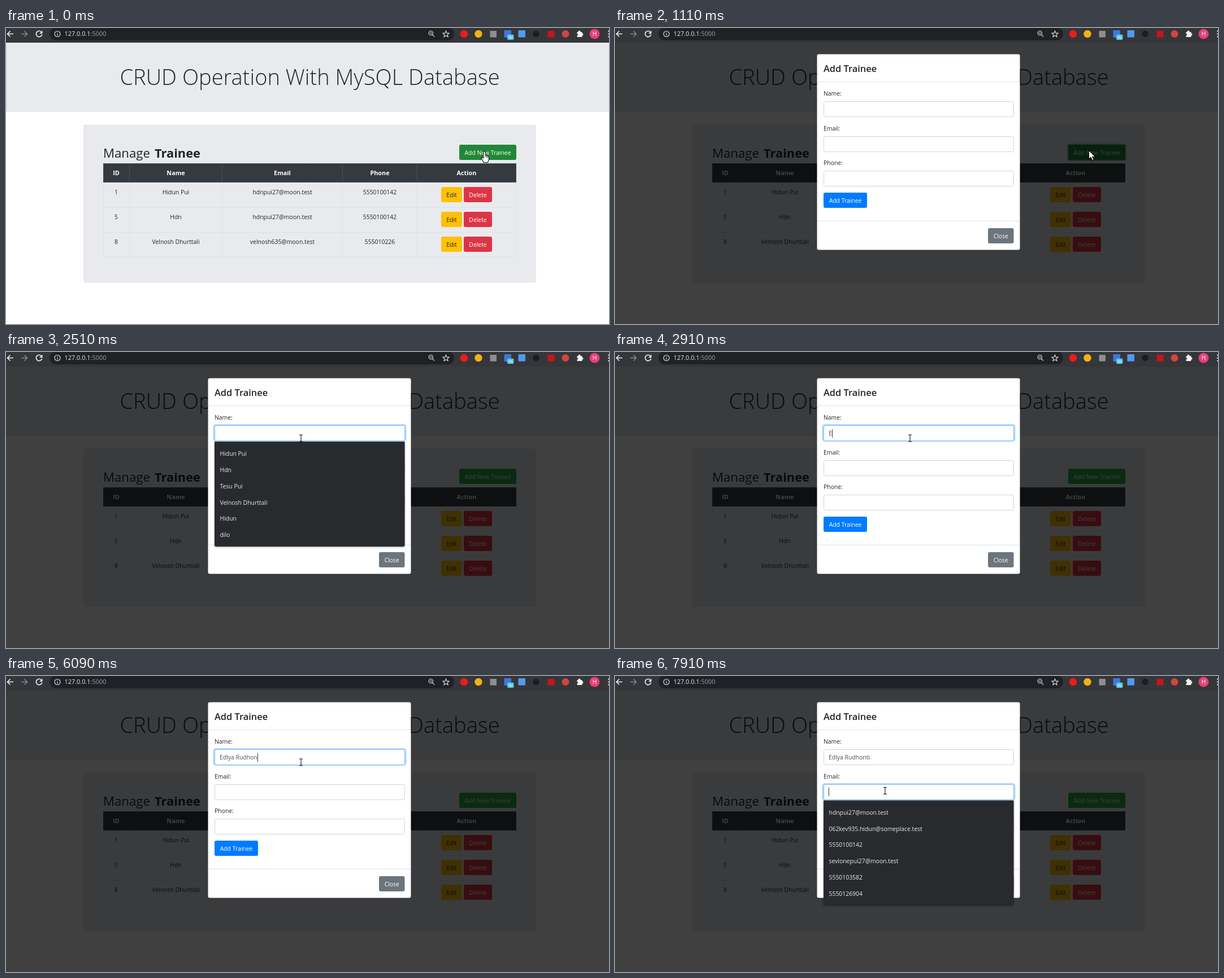
Animation of 1067x525 px, one loop 8000 ms. Source, as an HTML page with a canvas:

```html
<!DOCTYPE html>
<html lang="en">
<head>
<meta charset="utf-8">
<title>Manage Trainee</title>
<style>
html, body { margin: 0; width: 100%; height: 100%; overflow: hidden; background: #fff; }
canvas { display: block; width: 1067px; height: 525px; }
</style>
</head>
<body>
<canvas id="stage" width="1067" height="525"></canvas>
<script>
const ctx = document.getElementById('stage').getContext('2d');
const LOOP = 8000, BODY = 10.4, PANEL = '#e9eaee', INK = '#212529', BAR = 26;

const fullName = 'Edlya Rudhonti';
const keyTimes = [2910, 3730, 4010, 4160, 4310, 4430, 4890, 5350, 5520, 5820, 5940, 6090, 6340, 6640];
const caretOn = [[1930, 2510], [2910, 3450], [3730, 7070], [7610, 7910]];
const pointerSteps = [
  [0, 'hand', 846.5, 218.5], [600, 'arrow', 843, 236], [720, 'hand', 839.5, 216.5],
  [1110, 'arrow', 838.5, 217], [1390, 'arrow', 664, 226], [1540, 'beam', 586, 204],
  [1660, 'arrow', 538, 166], [1780, 'beam', 522, 153], [7480, 'beam', 508, 168],
  [7610, 'arrow', 486, 181], [7760, 'beam', 478, 203.5]
];
const rows = [
  ['1', 'Hidun Pui', 'hdnpui27@moon.test', '5550100142'],
  ['5', 'Hdn', 'hdnpui27@moon.test', '5550100142'],
  ['8', 'Velnosh Dhurttali', 'velnosh635@moon.test', '555010226']
];
const nameHints = ['Hidun Pui', 'Hdn', 'Tesu Pui', 'Velnosh Dhurttali', 'Hidun', 'dilo'];
const emailHints = ['hdnpui27@moon.test', '062kev935.hidun@someplace.test', '5550100142',
  'sevlonepui27@moon.test', '5550103582', '5550126904'];

function text(str, x, y, { size = BODY, weight = 400, color = INK, align = 'left' } = {}) {
  ctx.font = `${weight} ${size}px "Open Sans", "Noto Sans", sans-serif`;
  ctx.fillStyle = color;
  ctx.textAlign = align;
  ctx.fillText(str, x, y);
}
function box(x, y, w, h, color, r = 0, border) {
  ctx.beginPath();
  ctx.roundRect(x, y, w, h, r);
  ctx.fillStyle = color;
  ctx.fill();
  if (border) line(null, border);
}
function disc(x, y, r, color) {
  ctx.beginPath();
  ctx.arc(x, y, r, 0, 7);
  ctx.fillStyle = color;
  ctx.fill();
}
function line(path, color, width = 1) {
  ctx.strokeStyle = color;
  ctx.lineWidth = width;
  path ? ctx.stroke(new Path2D(path)) : ctx.stroke();
}
function button(label, x, y, w, color, ink = '#fff') {
  box(x, y, w, 27, color, 3);
  text(label, x + w / 2, y + 17.6, { color: ink, align: 'center' });
}

function browserBar() {
  box(0, 0, 1067, BAR, '#35363a');
  box(77, -1, 716, 23, '#202124', 11.5);
  line('M13 10.5H3M7.5 5.5L2.5 10.5L7.5 15.5', '#eef0f2', 1.6);
  line('M27 10.5H37M32.5 5.5L37.5 10.5L32.5 15.5', '#85878b', 1.5);
  line('M62.5 7A5.2 5.2 0 1 0 63.7 11.5', '#eef0f2', 1.7);
  ctx.fillStyle = '#eef0f2';
  ctx.fill(new Path2D('M64.5 4.5V10H59Z'));
  line('M96 10.5A5 5 0 1 1 86 10.5A5 5 0 1 1 96 10.5M91 9.8V13.5M91 7.3V8.6', '#d5d7da', 1.2);
  text('127.0.0.1', 103.5, 14.3, { size: 10.9, color: '#e8eaed' });
  text(':5000', 103.5 + ctx.measureText('127.0.0.1').width, 14.3, { size: 10.9, color: '#9aa0a6' });
  line('M755.5 9A3.7 3.7 0 1 1 748.1 9A3.7 3.7 0 1 1 755.5 9M754.5 12L758 15.5M750 9H753.7', '#c7c9cc', 1.3);
  line('M778.5 5.2L780 8.9L784 9.2L781 11.8L782 15.7L778.5 13.5L775 15.7L776 11.8L773 9.2L777 8.9Z', '#d5d7da', 1.2);

  disc(810.5, 10.5, 6.8, '#ec1c1c');
  disc(836, 10.5, 6.7, '#f3b211');
  box(856.5, 5, 11.5, 11.5, '#8d8f92', 1);
  box(881.5, 4, 12.5, 13, '#3b78dc', 1);
  box(887, 11.5, 11.5, 9.5, '#5cc3dc', 2);
  text('0s', 892.8, 19, { size: 7, color: '#fff', align: 'center' });
  box(906.5, 4, 12.5, 12.5, '#4f9bf0', 1);
  disc(938, 10.5, 5.8, '#1c1d20');
  box(958.5, 5, 12, 11.5, '#c5161c', 1);
  disc(990, 10.5, 6.5, '#d2453f');
  box(1010.5, 7, 9, 9, '#f1f3f4', 1);
  disc(1014.5, 6.5, 2, '#f1f3f4');
  disc(1019.5, 11.5, 2, '#f1f3f4');
  disc(1011, 11.8, 1.4, '#35363a');
  disc(1041.5, 10.5, 9, '#e83e78');
  text('H', 1041.5, 14.2, { color: '#fff', align: 'center' });
  for (const y of [5.5, 10.5, 15.5]) disc(1066.5, y, 1.2, '#dfe1e4');
}

function page(t) {
  box(0, BAR, 1067, 499, '#fff');
  box(0, BAR, 1067, 123, PANEL);
  line('M.5 29V146', '#c9cacf');
  text('CRUD Operation With MySQL Database', 537.5, 101, { size: 38.1, weight: 300, align: 'center' });

  box(137, 171.5, 801, 280.5, PANEL, 4);
  text('Manage', 172, 230, { size: 22.2, weight: 500 });
  text('Trainee', 263, 230, { size: 21.8, weight: 700 });

  const focused = t >= 870 && t < 1930;
  if (focused) box(800, 205, 105, 31, `rgba(72,180,97,${t < 990 ? .25 : .55})`, 4);
  const hovered = t < 600 || t >= 720 && t < 870;
  button('Add New Trainee', 802, 207, 101, focused ? '#1e7e34' : hovered ? '#218838' : '#28a745');

  const centers = [195, 300.5, 489, 661.5, 815];
  box(172.5, 240.5, 730, 33, '#343a40', 0, '#454d55');
  ['ID', 'Name', 'Email', 'Phone', 'Action'].forEach((label, i) =>
    text(label, centers[i], 261.3, { size: 10.8, weight: 700, color: '#fff', align: 'center' }));
  for (const x of [172.5, 218.5, 382.5, 595.5, 727.5, 902.5]) {
    line(`M${x} 240V274`, '#454d55');
    line(`M${x} 274V407`, '#dee1e5');
  }
  line('M172 318.5H903M172 362.5H903M172 406.5H903', '#dee1e5');
  rows.forEach((row, i) => {
    const y = 282 + i * 44;
    row.forEach((cell, col) => text(cell, centers[col], y + 13.2, { align: 'center' }));
    button('Edit', 770, y, 37, '#ffc107', INK);
    button('Delete', 810, y, 50, '#dc3545');
  });
}

function field(label, y, focus) {
  text(label, 369, y - 10);
  if (focus) box(366.5, y - 2, 342, 31, `rgba(0,123,255,${focus})`, 5);
  box(369.5, y + .5, 336, 27, '#fff', 3, focus ? '#80bdff' : '#ced4da');
}
function caret(x, y) {
  box(Math.round(x), y, 1, 15, '#30363c');
}
function hints(items, y) {
  ctx.save();
  ctx.shadowColor = 'rgba(0,0,0,.45)';
  ctx.shadowBlur = 3;
  ctx.shadowOffsetY = 1;
  box(369, y, 336.5, 186, '#292a2d', [0, 0, 3, 3]);
  ctx.restore();
  items.forEach((item, i) => text(item, 378.5, y + 25 + i * 28.85, { color: '#e8eaed' }));
}

function modal(t) {
  box(0, BAR, 1067, 499, 'rgba(0,0,0,.75)');
  box(357.5, 46.5, 359, 347, '#fff', 3);
  text('Add Trainee', 369, 78.3, { size: 16.4, weight: 600 });
  line('M358 95.5H716M358 342.5H716', '#dee2e6');
  const emailFocus = t >= 7910;
  const nameFocus = t >= 1930 && !emailFocus;
  field('Name:', 130, nameFocus && (t < 2050 ? .14 : .3));
  field('Email:', 192, emailFocus && .3);
  field('Phone:', 253, 0);
  button('Add Trainee', 369, 292, 77, '#007bff');
  button('Close', 660, 355, 45.5, '#6c757d');

  const typed = fullName.slice(0, keyTimes.filter(k => k <= t).length);
  text(typed, 378, 148.3, { color: '#495057' });
  if (caretOn.some(([from, to]) => t >= from && t < to)) caret(378 + ctx.measureText(typed).width, 137);
  if (t >= 2050 && t < keyTimes[0]) hints(nameHints, 159);
  if (emailFocus) {
    caret(378, 198);
    hints(emailHints, 220.7);
  }
}

const pointerShapes = {
  hand: new Path2D('M-1.7 1.5Q0-1 1.7 1.5V7L5.8 8Q8 8.6 8 11V14.5L6 20H-1L-5 13.5Q-6 10.5-4 11L-1.7 12.5Z'),
  arrow: new Path2D('M0 0V15.5L3.6 12.2L6 17.8L8.6 16.7L6.2 11.2H11Z'),
  beam: new Path2D('M-3-6H-1L0-5L1-6H3M0-5V5M-3 6H-1L0 5L1 6H3')
};
function pointer(t) {
  const [, kind, x, y] = pointerSteps.filter(step => step[0] <= t).pop();
  ctx.save();
  ctx.translate(x, y);
  ctx.strokeStyle = '#111';
  ctx.lineWidth = 1.1;
  if (kind !== 'beam') {
    ctx.fillStyle = '#fff';
    ctx.fill(pointerShapes[kind]);
  }
  ctx.stroke(pointerShapes[kind]);
  if (kind === 'hand') line('M1.7 7V11M4 8V11.5M6 9V12', '#111', .8);
  ctx.restore();
}

function draw() {
  const t = performance.now() % LOOP;
  page(t);
  if (t >= 1110) modal(t);
  browserBar();
  pointer(t);
  requestAnimationFrame(draw);
}
draw();
</script>
</body>
</html>
```
